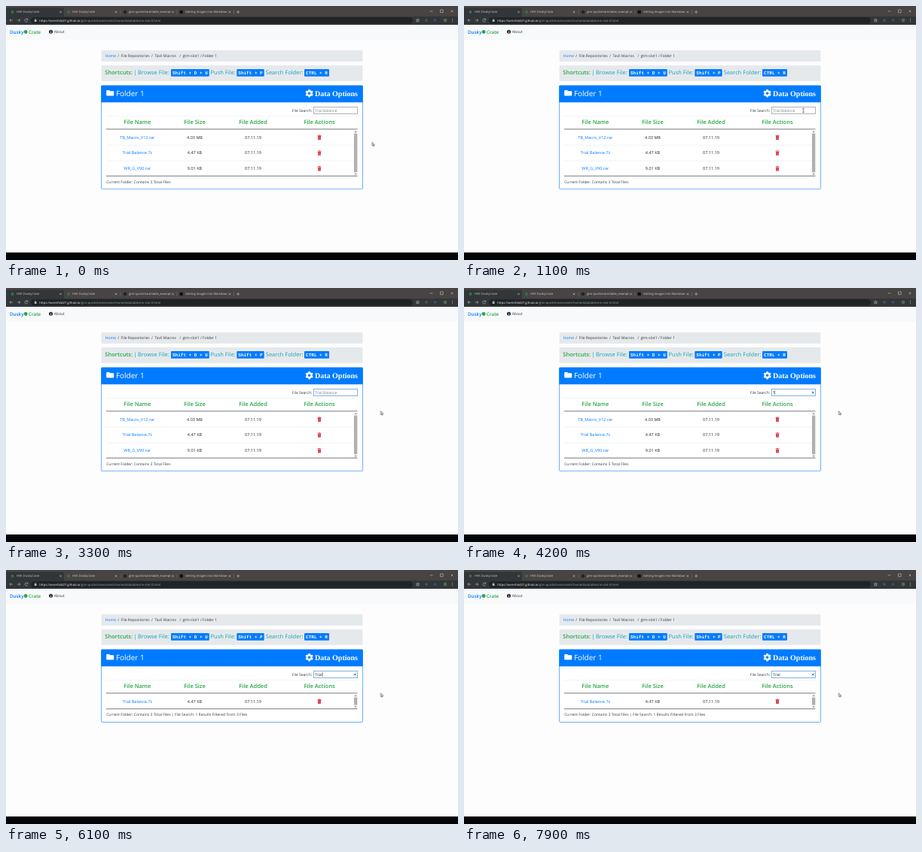
These frames come from a looping animation (600 px wide and 338 px high, 8000 ms). An HTML page:

```html
<!DOCTYPE html>
<html lang="en">
<head>
<meta charset="utf-8">
<title>File search</title>
<style>
  html, body { margin: 0; width: 100%; height: 100%; overflow: hidden; background: #fdfdfe; }
  svg { display: block; width: 100vw; height: 100vh; }
  text {
    font: 5px "Open Sans", "Noto Sans", sans-serif; fill: #343a40;
    white-space: pre; text-rendering: geometricPrecision;
  }
  .mid text { text-anchor: middle; }
  .brand { font-size: 6.25px; font-weight: 600; }
  .chrome text { font-size: 4px; fill: #ccced0; }
  .chrome .url { font-size: 4.15px; fill: #a0a4a7; }
  .url .host { fill: #f1f3f4; }
  .chrome path { fill: none; stroke: #ccced0; stroke-width: .55; }
  .hint text { font-size: 7.5px; fill: #17a2b8; }
  .hint .key { font: bold 6px "Liberation Mono", "DejaVu Sans Mono", monospace; fill: #fff; }
  .hint .lead { font-weight: 600; fill: #28a745; }
  .head text { font-size: 7.5px; font-weight: 600; fill: #28a745; }
  .row text { font-size: 5.5px; fill: #212529; }
  .link, .row .link { fill: #007bff; }
  .band { fill: #e6e9ec; }
  .title { font-size: 10px; fill: #fff; }
  .options { font: bold 10px "Liberation Serif", "Noto Serif", serif; fill: #fff; }
  .rule { stroke: #dee2e6; stroke-width: .5; }
  .dark { stroke: #65696d; stroke-width: .9; }
  .card { fill: #fff; stroke: #2f8ff5; stroke-width: .7; }

  /* every timeline shares one 8 s loop */
  .pointer, .arrow, .beam, .blur, .focus, .all, .filtered, .hintText, .clear, .type, .caret {
    animation: 8s step-end infinite;
  }
  .pointer { animation-name: move; animation-timing-function: ease-in-out; }
  .arrow { animation-name: arrow; }
  .beam { animation-name: beam; }
  .blur { animation-name: blur; }
  .focus { animation-name: focus; }
  .all { animation-name: all; }
  .filtered { animation-name: filtered; }
  .hintText { animation-name: empty; }
  .clear { animation-name: clear; }
  .type { animation-name: type; }
  .caret { animation-name: blink; }

  @keyframes move {
    0%, 2.5% { transform: translate(486px, 181.2px); }
    11.25%, 23.2% { transform: translate(450.5px, 138.9px); animation-timing-function: linear; }
    27.5% { transform: translate(480.4px, 152.1px); animation-timing-function: ease-out; }
    32.5%, 100% { transform: translate(497.4px, 163.8px); }
  }
  @keyframes arrow { 0% { opacity: 1; } 10.4% { opacity: 0; } 24.6%, 100% { opacity: 1; } }
  @keyframes beam { 0% { opacity: 0; } 10.4% { opacity: 1; } 24.6%, 100% { opacity: 0; } }
  @keyframes blur { 0% { opacity: 1; } 21.25%, 100% { opacity: 0; } }
  @keyframes focus { 0% { opacity: 0; } 21.25%, 100% { opacity: 1; } }
  @keyframes all { 0% { opacity: 1; } 66.25%, 100% { opacity: 0; } }
  @keyframes filtered { 0% { opacity: 0; } 66.25%, 100% { opacity: 1; } }
  @keyframes empty { 0% { opacity: 1; } 52.5%, 100% { opacity: 0; } }
  @keyframes clear { 0% { opacity: 0; } 52.5%, 100% { opacity: 1; } }
  @keyframes type {
    0% { transform: translateX(0); }
    52.5% { transform: translateX(2.5px); }
    56.25% { transform: translateX(4.5px); }
    66.25% { transform: translateX(5.8px); }
    71.25% { transform: translateX(8.6px); }
    75%, 100% { transform: translateX(10px); }
  }
  @keyframes blink {
    0% { opacity: 0; }
    21.25% { opacity: 1; } 27.5% { opacity: 0; }
    33.75% { opacity: 1; } 40% { opacity: 0; }
    46.25% { opacity: 1; } 62.5% { opacity: 0; }
    66.25% { opacity: 1; } 81.25% { opacity: 0; }
    87.5% { opacity: 1; } 93.75%, 100% { opacity: 0; }
  }
</style>
</head>
<body>
<svg viewBox="0 0 600 338" preserveAspectRatio="none">
  <defs>
    <path id="x" d="M-1.3-1.3 1.3 1.3M1.3-1.3-1.3 1.3" stroke="#ccced0" stroke-width=".55"/>
    <g id="trash" fill="#dc3545">
      <path d="M-2.5-2.9H-1L-.6-3.4H.6L1-2.9H2.5V-2.1H-2.5Z"/>
      <path d="M-2.1-1.7H2.1L1.8 3.1H-1.8Z"/>
      <path d="M-.9-1V2.3M0-1V2.3M.9-1V2.3" stroke="#f4b8be" stroke-width=".2"/>
    </g>
    <rect id="tooth" x="-1.2" y="-5.2" width="2.4" height="10.4" rx=".5"/>
  </defs>

  <rect width="600" height="338" fill="#fdfdfe"/>

  <!-- browser window -->
  <g class="chrome">
    <rect width="600" height="14" fill="#484443"/>
    <path d="M0 14V2.5H75Q77 2.5 77 4.5V14Z" style="fill:#323639;stroke:none"/>
    <rect y="14" width="600" height="11" fill="#323639"/>
    <rect x="33" y="15" width="507" height="8.4" rx="4.2" fill="#202427"/>
    <circle cx="8.5" cy="8" r="1.9" fill="#267a50"/>
    <circle cx="83" cy="8" r="1.9" fill="#267a50"/>
    <circle cx="158" cy="8" r="2.2" fill="#1f2326"/>
    <rect x="230.5" y="5.8" width="4.4" height="4.4" fill="#111"/>
    <text x="14" y="9.4">HVK DuskyCrate</text>
    <text x="88" y="9.4">HVK DuskyCrate</text>
    <text x="163" y="9.4">gtm-quickshare/table_example.j</text>
    <rect x="218.5" y="4" width="8" height="8" fill="#484443"/>
    <text x="238" y="9.4">Getting Images into Markdown d</text>
    <rect x="293.5" y="4" width="10" height="8" fill="#484443"/>
    <path d="M152 5V11M227 5V11M302.5 5V11" style="stroke:#777473"/>
    <use href="#x" x="72.5" y="8"/><use href="#x" x="146" y="8"/>
    <use href="#x" x="221.5" y="8"/><use href="#x" x="297" y="8"/>
    <use href="#x" x="592" y="7"/>
    <path d="M306 8H310.4M308.2 5.8V10.2M562.5 7H566.5M576.5 5H580.2V8.7H576.5Z"/>
    <path d="M9 19H5M6.8 17.1 4.9 19 6.8 20.9M14.8 19H18.8M17 17.1 18.9 19 17 20.9M28.6 17.8A2 2 0 1 0 28.8 19.8M28.9 16.6V18.2H27.2"/>
    <rect x="37.8" y="18.5" width="2.7" height="2.3" fill="#ccced0"/>
    <path d="M38.3 18.6V17.7Q39.15 16.3 40 17.7V18.6"/>
    <text class="url" x="44.2" y="20.6"><tspan class="host">https://wrenfold27.github.io</tspan>/gtm-quickshare/assets/home/datatables/m-slot-0.html</text>
    <path d="M546.5 16.7 547.2 18.3 548.8 18.4 547.6 19.5 548 21.1 546.5 20.2 545 21.1 545.4 19.5 544.2 18.4 545.8 18.3Z"/>
    <circle cx="558" cy="19" r="1.8" fill="#4b5a58"/>
    <circle cx="569.5" cy="19" r="1.8" fill="#2f5672"/>
    <circle cx="583" cy="19" r="2.4" fill="#4d6a58"/>
    <path d="M592.5 16.8V17.6M592.5 18.6V19.4M592.5 20.4V21.2" style="stroke-width:.8"/>
  </g>

  <!-- site bar -->
  <rect y="25" width="600" height="19.8" fill="#f8f9fa"/>
  <text class="brand link" x="5" y="36.8">Dusky</text>
  <circle cx="26.2" cy="34.5" r="2.4" fill="#28a745"/>
  <text class="brand" x="30" y="36.8" style="fill:#28a745">Crate</text>
  <circle cx="59.5" cy="34.3" r="2.5" fill="#212529"/>
  <path d="M59.5 32.6V33.3M59.5 33.9V35.9" stroke="#fff" stroke-width=".8"/>
  <text x="63.7" y="36.2">About</text>

  <!-- breadcrumb -->
  <rect class="band" x="126.6" y="59" width="346.8" height="15" rx="1"/>
  <text class="link" x="131.8" y="68.4">Home</text>
  <text x="148.3" y="68.4">/</text>
  <text x="152.6" y="68.4">File Repositories</text>
  <text x="193" y="68.4">/</text>
  <text x="197.4" y="68.4">Tavil Macros</text>
  <text x="230.4" y="68.4">/</text>
  <text x="234.6" y="68.4">gtm-slot1 / Folder 1</text>

  <!-- shortcuts -->
  <g class="hint">
    <rect class="band" x="126.6" y="79" width="346.8" height="20.8" rx="1"/>
    <text class="lead" x="131.3" y="91.2">Shortcuts:</text>
    <text x="169.2" y="91.2">|</text>
    <text x="175" y="91.2">Browse File:</text>
    <text x="271.6" y="91.2">Push File:</text>
    <text x="344.8" y="91.2">Search Folder:</text>
    <g fill="#007bff">
      <rect x="219" y="84" width="50.8" height="9.8" rx="1"/>
      <rect x="306.3" y="84" width="36.4" height="9.8" rx="1"/>
      <rect x="396" y="84" width="33" height="9.8" rx="1"/>
    </g>
    <text class="key" x="221" y="90.9">Shift + D + U</text>
    <text class="key" x="308.3" y="90.9">Shift + P</text>
    <text class="key" x="398.1" y="90.9">CTRL + R</text>
  </g>

  <!-- card frames -->
  <rect class="card all" x="126.5" y="106" width="347" height="137.6" rx="1"/>
  <rect class="card filtered" x="126.5" y="106" width="347" height="96.5" rx="1"/>
  <path d="M126.3 128.2V107Q126.3 105.8 127.5 105.8H472.5Q473.7 105.8 473.7 107V128.2Z" fill="#007bff"/>
  <path d="M133.2 113Q133.2 112 134.2 112H137L138.3 113.3H142.2Q143.2 113.3 143.2 114.3V118.6Q143.2 119.6 142.2 119.6H134.2Q133.2 119.6 133.2 118.6Z" fill="#fff"/>
  <text class="title" x="145.9" y="119.8">Folder 1</text>
  <g fill="#fff" transform="translate(402.6 116.2)">
    <circle r="4"/>
    <use href="#tooth"/>
    <use href="#tooth" transform="rotate(60)"/>
    <use href="#tooth" transform="rotate(120)"/>
    <circle r="1.7" fill="#007bff"/>
  </g>
  <text class="options" x="410" y="120.2">Data Options</text>

  <!-- search field -->
  <text x="379.8" y="140.9">File Search:</text>
  <rect x="408.5" y="134.5" width="58" height="9" fill="#fff"/>
  <rect class="blur" x="408.5" y="134.5" width="58" height="9" fill="none" stroke="#9b9fa3" stroke-width=".8"/>
  <rect class="focus" x="408.5" y="134.5" width="58" height="9" fill="none" stroke="#74a9dc" stroke-width=".9"/>
  <text x="409.9" y="140.9" style="fill:#212529">Trial</text>
  <rect class="type" x="409.9" y="135.3" width="45" height="7.2" fill="#fff"/>
  <text class="hintText" x="409.9" y="140.9" style="fill:#7c8085">Trial Balance</text>
  <g class="type"><path class="caret" d="M410 136.2V142" stroke="#111" stroke-width=".5"/></g>
  <path class="clear" d="M462 137.8 464.6 140.4M464.6 137.8 462 140.4" stroke="#1f4f86" stroke-width=".9"/>

  <!-- table -->
  <path class="rule" d="M133 146.3H466.5"/>
  <g class="head mid">
    <text x="174.3" y="157">File Name</text>
    <text x="250.5" y="157">File Size</text>
    <text x="328" y="157">File Added</text>
    <text x="416" y="157">File Actions</text>
  </g>
  <path class="dark" d="M133 163.9H466.5"/>

  <g class="all">
    <path class="rule" d="M133 185.2H461.5M133 206H461.5"/>
    <g class="row mid">
      <text class="link" x="174.3" y="176.6">TB_Macro_V12.rar</text>
      <text x="250.5" y="176.6">4.03 MB</text>
      <text x="328" y="176.6">07.11.19</text>
    </g>
    <g class="row mid" id="trial">
      <text class="link" x="174.3" y="197.4">Trial Balance.7z</text>
      <text x="250.5" y="197.4">4.47 KB</text>
      <text x="328" y="197.4">07.11.19</text>
      <use href="#trash" x="416" y="195.6"/>
    </g>
    <g class="row mid">
      <text class="link" x="174.3" y="218.2">WR_G_V90.rar</text>
      <text x="250.5" y="218.2">9.01 KB</text>
      <text x="328" y="218.2">07.11.19</text>
    </g>
    <use href="#trash" x="416" y="174.8"/>
    <use href="#trash" x="416" y="216.4"/>
    <rect x="461.6" y="164.7" width="5" height="61.4" fill="#f1f1f1"/>
    <rect x="462" y="169.7" width="4.2" height="51.5" fill="#b0b0b0"/>
    <path d="M463 168 464.1 166.4 465.2 168ZM463 223 464.1 224.6 465.2 223Z" fill="#505050"/>
    <path class="dark" d="M133 226.2H466.5"/>
    <text x="133.2" y="235.6">Current Folder: Contains 3 Total Files</text>
  </g>

  <g class="filtered">
    <use href="#trial" y="-20.8"/>
    <rect x="461.6" y="164.7" width="5" height="20" fill="#f1f1f1"/>
    <rect x="462" y="169.7" width="4.2" height="9.8" fill="#b0b0b0"/>
    <path d="M463 168 464.1 166.4 465.2 168ZM463 181.4 464.1 183 465.2 181.4Z" fill="#505050"/>
    <path class="dark" d="M133 184.8H466.5"/>
    <text x="133.2" y="194.2">Current Folder: Contains 3 Total Files | File Search: 1 Results Filtered From 3 Files</text>
  </g>

  <rect y="328" width="600" height="10" fill="#030405"/>

  <g class="pointer">
    <path class="arrow" d="M0 0V4.7L1.1 3.7 1.9 5.4 2.7 5 1.9 3.4H3.3Z" fill="#fff" stroke="#111" stroke-width=".5"/>
    <path class="beam" d="M-1-2.6H1M0-2.6V2.6M-1 2.6H1" fill="none" stroke="#111" stroke-width=".6"/>
  </g>
</svg>
</body>
</html>
```
